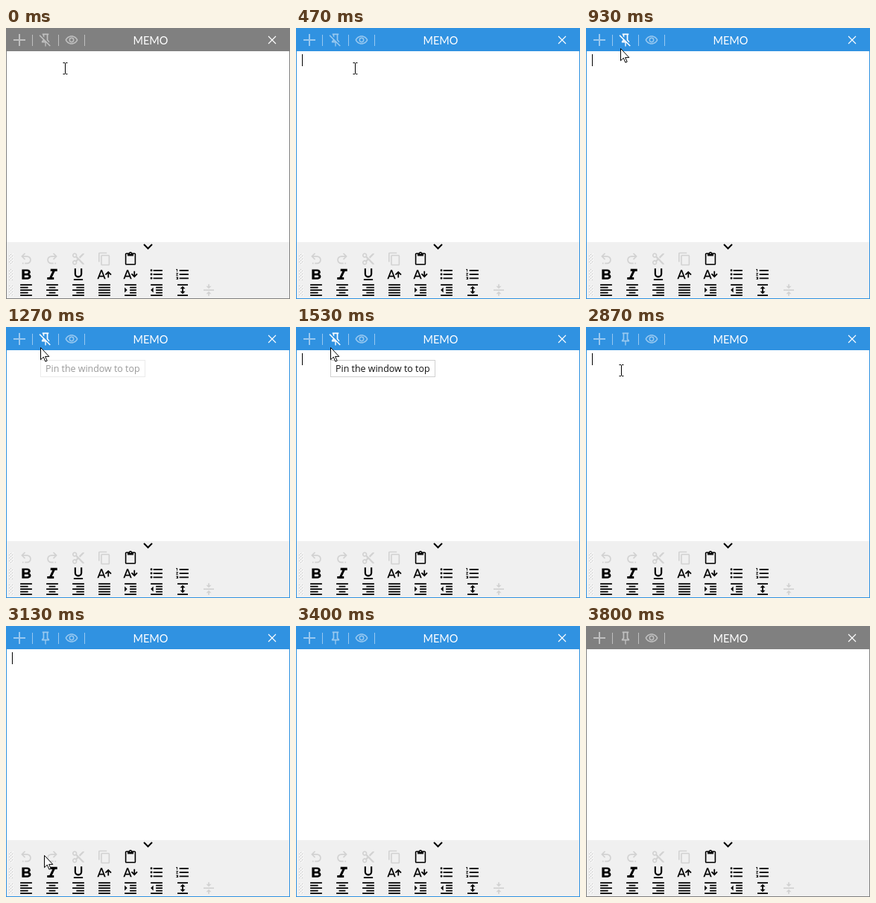
These frames come from a looping animation (381x362 px, 3.87 s). An HTML page:

```html
<!DOCTYPE html>
<html lang="en">
<head>
<meta charset="utf-8">
<title>Memo window</title>
<style>
  html, body { margin: 0; width: 100%; height: 100%; overflow: hidden; }
  svg { display: block; width: 381px; height: 362px; }
  .title { font: 400 14.5px Lato, sans-serif; fill: #fff; text-anchor: middle; }
  .tip { font: 400 12.45px "Open Sans", sans-serif; fill: #111; }
  .dim { opacity: .5; }
  .off { fill: #d2d2d2; }
</style>
</head>
<body>
<svg viewBox="0 0 381 362" xmlns="http://www.w3.org/2000/svg">
  <defs>
    <pattern id="dots" width="4" height="4" patternUnits="userSpaceOnUse">
      <path d="M0 0h1v1h-1zM2 2h1v1h-1z" fill="#c4c4c4"/>
      <path d="M1 1h1v1h-1zM3 3h1v1h-1z" fill="#fff"/>
    </pattern>
  </defs>
  <rect id="frame" width="381" height="362"/>
  <rect x="1" y="31" width="379" height="255" fill="#fff"/>
  <rect x="1" y="286" width="379" height="75" fill="#f0f0f0"/>

  <path class="dim" d="M10 16h16M18 8v16" stroke="#fff" stroke-width="2"/>
  <path class="dim" d="M35.5 9v15M70.5 9v15M105.5 9v15" stroke="#fff"/>
  <g id="bar" fill="#fff"></g>
  <text class="title" x="194" y="21.5">MEMO</text>
  <path d="M352 11l10 10M362 11l-10 10" stroke="#fff" stroke-width="1.1"/>

  <path d="M185 289l5.5 5.5l5.5-5.5" fill="none" stroke="#000" stroke-width="2"/>
  <g id="tools"></g>
  <rect id="caret" x="8" y="35" width="1" height="16"/>

  <g id="tip">
    <rect x="46.5" y="44.5" width="140" height="22" fill="#fff" stroke="#d0d0d0"/>
    <text class="tip" x="53" y="60">Pin the window to top</text>
  </g>

  <g id="cursors">
    <path id="arrow" d="M.5 .5v16.2l3.8-3.6l2.6 6l2.3-1l-2.6-5.7h5.2z" fill="#fff" stroke="#000"/>
    <path id="beam" d="M-3 -7.5h2.5M.5 -7.5h2.5M-3 7.5h2.5M.5 7.5h2.5M0 -7v14" fill="none" stroke="#000"/>
    <path id="size" d="M4.5 .7l3.8 4.3h-2.8v13h2.8l-3.8 4.3l-3.8-4.3h2.8v-13h-2.8z" fill="#fff" stroke="#000"/>
  </g>
</svg>
<script>
const NS = 'http://www.w3.org/2000/svg';
const $ = id => document.getElementById(id);
const LOOP = 3870;

// Icon outlines on a 24-unit grid
const UNDO = 'M13.5 7A6.5 6.5 0 0 1 20 13.5A6.5 6.5 0 0 1 13.5 20H10V18H13.5C16 18 18 16 18 13.5C18 11 16 9 13.5 9H7.83L10.91 12.09L9.5 13.5L4 8L9.5 2.5L10.92 3.91L7.83 7ZM6 18H8V20H6Z';
const CUT = 'M9.64 7.64c.23-.5.36-1.05.36-1.64 0-2.21-1.79-4-4-4S2 3.79 2 6s1.79 4 4 4c.59 0 1.14-.13 1.64-.36L10 12l-2.36 2.36C7.14 14.13 6.59 14 6 14c-2.21 0-4 1.79-4 4s1.79 4 4 4 4-1.79 4-4c0-.59-.13-1.14-.36-1.64L12 14l7 7h3v-1zM6 8a2 2 0 1 1 0-4a2 2 0 1 1 0 4zm0 12a2 2 0 1 1 0-4a2 2 0 1 1 0 4zM19 3l-6 6 2 2 7-7V3z';
const COPY = 'M16 1H4c-1.1 0-2 .9-2 2v14h2V3h12zm3 4H8c-1.1 0-2 .9-2 2v14c0 1.1.9 2 2 2h11c1.1 0 2-.9 2-2V7c0-1.1-.9-2-2-2zm0 16H8V7h11z';
const PASTE = 'M19 2h-4.18C14.4.84 13.3 0 12 0s-2.4.84-2.82 2H5c-1.1 0-2 .9-2 2v16c0 1.1.9 2 2 2h14c1.1 0 2-.9 2-2V4c0-1.1-.9-2-2-2zm-7 0a1 1 0 1 1 0 2a1 1 0 1 1 0-2zm7 18H5V4h2v3h10V4h2z';
const BOLD = 'M15.6 10.79c.97-.67 1.65-1.77 1.65-2.79 0-2.26-1.75-4-4-4H7v14h7.04c2.09 0 3.71-1.7 3.71-3.79 0-1.52-.86-2.82-2.15-3.42zM10 6.5h3a1.5 1.5 0 0 1 0 3h-3zm3.5 9H10v-3h3.5a1.5 1.5 0 0 1 0 3z';
const ITALIC = 'M10 4v3h2.21l-3.42 8H6v3h8v-3h-2.21l3.42-8H18V4z';
const UNDERLINE = 'M12 17c3.31 0 6-2.69 6-6V3h-2.5v8a3.5 3.5 0 0 1-7 0V3H6v8c0 3.31 2.69 6 6 6zM5 19v2h14v-2z';
const LETTER = 'M5.12 14L7.5 7.67L9.87 14M6.5 5L1 19H3.25L4.37 16H10.62L11.75 19H14L8.5 5Z';
const GROW = LETTER + 'M18 7L13 12.07L14.41 13.5L17 10.9V17H19V10.9L21.59 13.5L23 12.07Z';
const SHRINK = LETTER + 'M18 17L23 11.93L21.59 10.5L19 13.1V7H17V13.1L14.41 10.5L13 11.93Z';
const ROWS = 'M7 5h14v2H7zM7 11h14v2H7zM7 17h14v2H7z';
const BULLETS = ROWS + [6, 12, 18].map(y => `M2.4 ${y}a1.6 1.6 0 1 1 3.2 0a1.6 1.6 0 1 1-3.2 0z`).join('');
const NUMBERS = ROWS + 'M2 17h2v.5H3v1h1v.5H2v1h3v-4H2zM3 8h1V4H2v1h1zM2 11h1.8L2 13.1v.9h3v-1H3.2L5 10.9V10H2z';
const SPACING = 'M4 3h16v2H4zM4 19h16v2H4zM12 6l4 4h-3v4h3l-4 4l-4-4h3v-4h-3z';
const SQUEEZE = 'M4 11h16v2H4zM16 6L12 10L8 6H11V3H13V6zM8 18L12 14L16 18H13V21H11V18z';
const PIN = 'M16 12V4H17V2H7V4H8V12L6 14V16H11.2V22H12.8V16H18V14ZM8.8 14L10 12.8V4H14V12.8L15.2 14Z';
const UNPIN = 'M8 6.2V4H7V2H17V4H16V12L18 14V16H17.8L14 12.2V4H10V8.2ZM20 20.7L18.7 22L12.8 16.1V22H11.2V16H6V14L8 12V11.3L2 5.3L3.3 4ZM8.8 14H10.6L9.7 13.1Z';
const EYE = 'M12 6.5c3.79 0 7.17 2.13 8.82 5.5C19.17 15.37 15.79 17.5 12 17.5S4.83 15.37 3.18 12C4.83 8.63 8.21 6.5 12 6.5m0-2C7 4.5 2.73 7.61 1 12c1.73 4.39 6 7.5 11 7.5s9.27-3.11 11-7.5C21.27 7.61 17 4.5 12 4.5zm0 5a2.5 2.5 0 1 1 0 5a2.5 2.5 0 1 1 0-5m0-2a4.5 4.5 0 1 0 0 9a4.5 4.5 0 1 0 0-9z';

// Five text lines; each entry is [left, width]
const lines = list => list.map(([x, w], i) => `M${x} ${3 + i * 4}h${w}v2h-${w}z`).join('');
const FULL = [3, 18], PART = [11, 10];
const align = short => lines([FULL, short, FULL, short, FULL]);
const indent = tri => lines([FULL, PART, PART, PART, FULL]) + tri;

function make(parent, tag, attrs) {
  const el = document.createElementNS(NS, tag);
  for (const k in attrs) el.setAttribute(k, attrs[k]);
  return parent.appendChild(el);
}

function icon(parent, d, x, y, sx, sy = sx, cls = '') {
  return make(parent, 'path', {
    d, class: cls, 'fill-rule': 'evenodd',
    transform: `translate(${x} ${y}) scale(${sx} ${sy}) translate(-12 -12)`
  });
}

const bar = $('bar'), tools = $('tools');
const pinOff = icon(bar, UNPIN, 53, 16, .85);
const pinOn = icon(bar, PIN, 53, 16, .85);
icon(bar, EYE, 88, 16, .77, .77, 'dim');

const column = i => 27 + 35 * i;
[[UNDO, -1], [UNDO, 1], [CUT], [COPY], [PASTE]].forEach(([d, flip], i) =>
  icon(tools, d, column(i), 308.5, flip ? -.85 * flip : .8, flip ? .85 : .8, i < 4 ? 'off' : ''));
// the arrow outline already points left
tools.children[0].setAttribute('transform', 'translate(27 308.5) scale(.85) translate(-12 -12)');

[[BOLD, 1.12, .95], [ITALIC, 1.12, 1.02], [UNDERLINE], [GROW], [SHRINK], [BULLETS], [NUMBERS]]
  .forEach(([d, sx = .875, sy = sx], i) => icon(tools, d, column(i), i < 2 ? 330 : 329, sx, sy));

[align([3, 12]), align([7, 10]), align([9, 12]), align(FULL),
 indent('M3 8v8l4-4z'), indent('M7 8v8l-4-4z'), SPACING, SQUEEZE]
  .forEach((d, i) => icon(tools, d, column(i), 350, .875, .875, i === 7 ? 'off' : ''));

for (const y of [301, 322, 343])
  make(tools, 'rect', { x: 4, y, width: 6, height: 15, fill: 'url(#dots)' });

// Pointer stops: time, shape, x, y
const POINTER = [
  [0, 'beam', 79.5, 54], [670, 'beam', 64.5, 46], [730, 'arrow', 47, 28],
  [930, 'arrow', 46, 27], [2870, 'beam', 47.5, 58], [2930, 'beam', 49.5, 140],
  [3000, 'beam', 50.5, 232], [3070, 'arrow', 51, 290], [3130, 'arrow', 51, 306],
  [3200, 'arrow', 50, 322], [3270, 'arrow', 47, 338], [3330, 'size', 45, 348],
  [3400, '', 0, 0]
];
const FADE = [[0, 0], [1200, .16], [1270, .42], [1330, .66], [1400, .88], [1470, 1], [1600, 0]];
const BLINK = [[0, 0], [470, 1], [1000, 0], [1530, 1], [2200, 0], [2670, 1], [3200, 0]];

const at = (steps, t) => steps.findLast(s => s[0] <= t);
const show = (el, on) => el.setAttribute('visibility', on ? 'visible' : 'hidden');

function draw(t) {
  const active = t >= 470 && t < 3800;
  const pinned = t >= 1670;
  const hover = t >= 730 && t < 2870;
  $('frame').setAttribute('fill', active ? '#3092e1' : '#808080');
  show(pinOff, !pinned);
  show(pinOn, pinned);
  for (const p of [pinOff, pinOn]) p.setAttribute('opacity', hover ? 1 : .5);
  show($('caret'), at(BLINK, t)[1]);
  $('tip').setAttribute('opacity', at(FADE, t)[1]);
  const [, shape, x, y] = at(POINTER, t);
  $('cursors').setAttribute('transform', `translate(${x} ${y})`);
  for (const id of ['arrow', 'beam', 'size']) show($(id), id === shape);
}

const start = performance.now();
function tick() {
  draw((performance.now() - start) % LOOP);
  requestAnimationFrame(tick);
}
tick();
</script>
</body>
</html>
```
